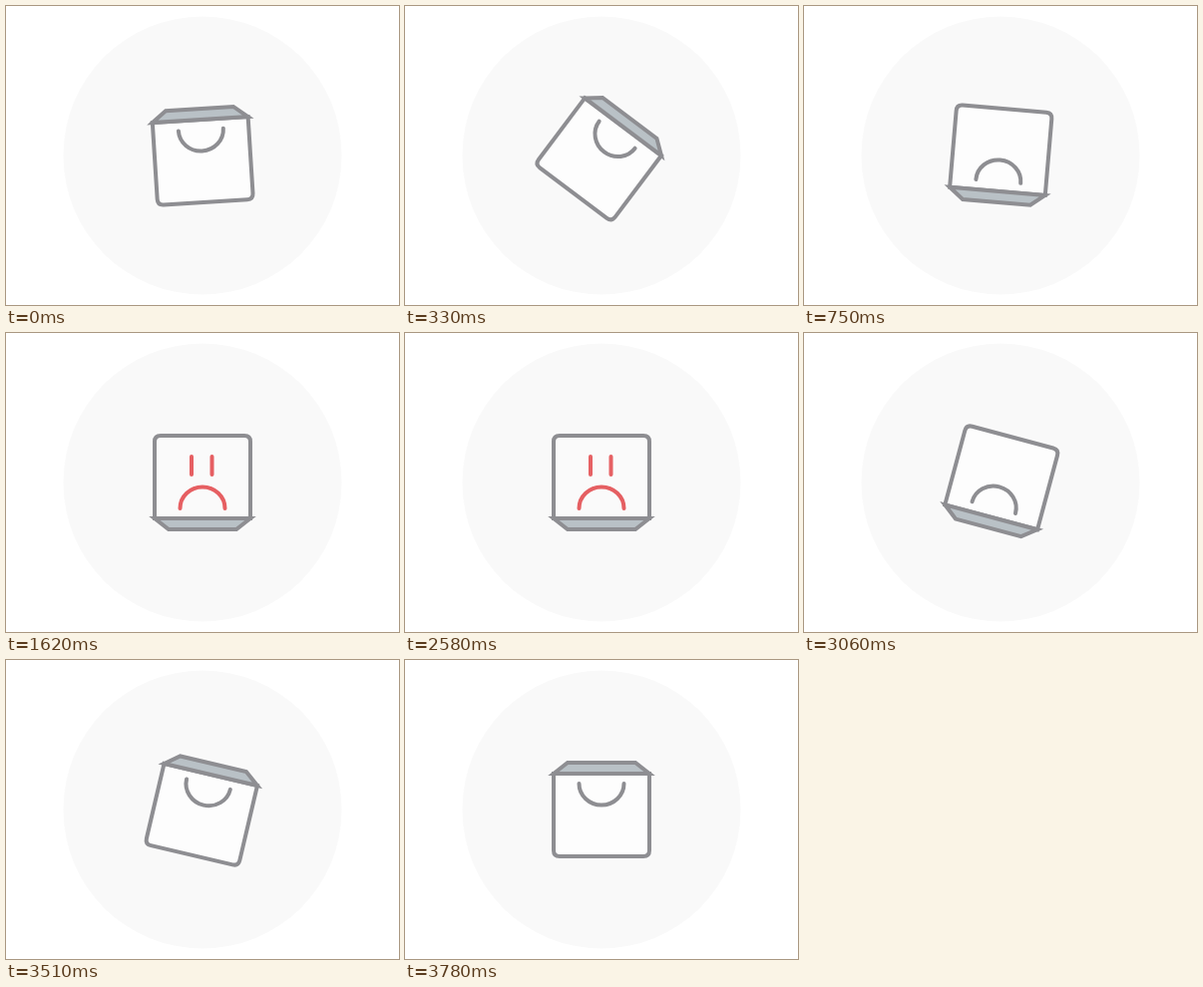
Write an HTML page that moves like this. It is 394x300 px and loops after 4.47 s.

```html
<!DOCTYPE html>
<html lang="en">
<head>
<meta charset="utf-8">
<title>Shopping bag</title>
<style>
  html, body { margin: 0; width: 100%; height: 100%; overflow: hidden; background: #fff; }
  svg { display: block; width: 100%; height: 100%; }
</style>
</head>
<body>
<svg viewBox="0 0 394 300">
  <circle cx="197" cy="150" r="139.5" fill="#f9f9f9"/>
  <g id="bag" fill="none" stroke="#8e8e92" stroke-width="4">
    <path id="body" d="M149 114V191q0 6 6 6H239q6 0 6-6V114Z"/>
    <path d="M149 114L163 103H231L245 114Z" fill="#b9c1c6"/>
    <path id="mouth" d="M174.5 124A22.5 21.5 0 0 0 219.5 124" stroke-linecap="round"/>
    <path id="eyes" d="M208 158V176M187.5 158V176" stroke="#e65f62" stroke-linecap="round"/>
  </g>
</svg>
<script>
const LOOP = 4470, STEP = 30, TURN = 888;
const [bag, body, mouth, eyes] = ['bag', 'body', 'mouth', 'eyes'].map(id => document.getElementById(id));

const clamp = v => Math.min(1, Math.max(0, v));
const progress = (t, start, length) => clamp((t - start) / length);
const smooth = u => u * u * (3 - 2 * u);
const mix = (a, b, k) => `rgb(${a.map((v, i) => Math.round(v + (b[i] - v) * k))})`;
const bezier = (a, b, s) => 3 * a * s * (1 - s) ** 2 + 3 * b * s * s * (1 - s) + s ** 3;

// Swings back, turns, then overshoots a little
function swing(u) {
  let lo = 0, hi = 1;
  for (let i = 0; i < 24; i++) {
    const mid = (lo + hi) / 2;
    if (bezier(.48, .43, mid) < u) lo = mid; else hi = mid;
  }
  return bezier(-.5, 1.27, (lo + hi) / 2);
}

function draw(t) {
  const angle = 180 * (swing(progress(t, -18, TURN)) - swing(progress(t, 2888, TURN)));
  const sad = smooth(progress(t, 1050, 570)) - smooth(progress(t, 2550, 510));
  bag.setAttribute('transform', `rotate(${angle.toFixed(3)} 197 150)`);
  body.setAttribute('fill', mix([253, 253, 253], [250, 250, 250], sad));
  mouth.setAttribute('stroke', mix([142, 142, 146], [230, 95, 98], sad));
  eyes.setAttribute('opacity', sad);
}

const begin = performance.now();
function tick() {
  const t = (performance.now() - begin) % LOOP;
  draw(Math.floor(t / STEP) * STEP);
  requestAnimationFrame(tick);
}
tick();
</script>
</body>
</html>
```
